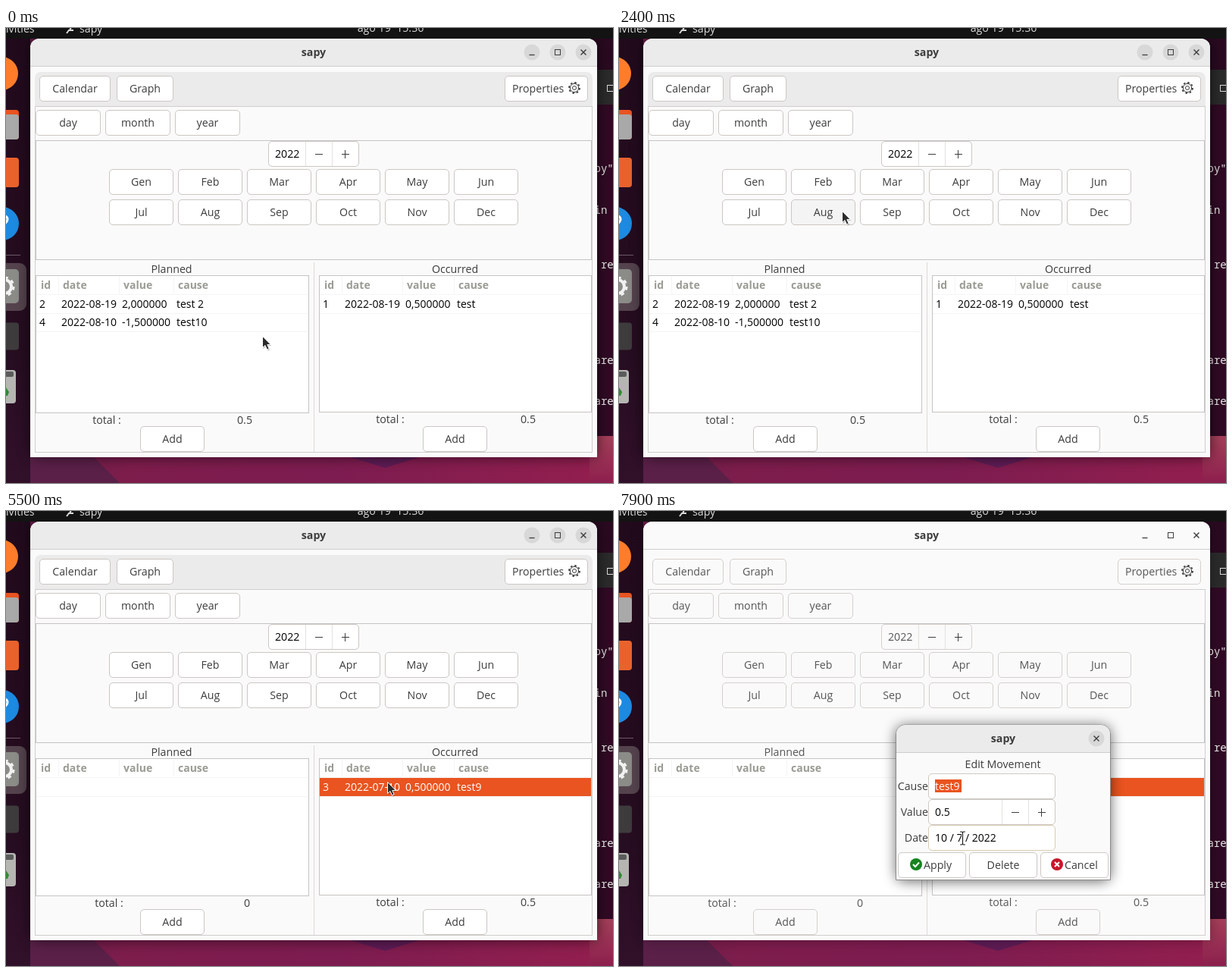
Recreate the animation shown at these times as an HTML page. Size 801x600 px, loop 8 s.

```html
<!DOCTYPE html>
<html lang="en">
<head>
<meta charset="utf-8">
<title>sapy</title>
<style>
html, body { margin: 0; width: 100%; height: 100%; overflow: hidden; background: #1c0a18; }
svg { display: block; width: 801px; height: 600px; }
text { font: 14.2px "Open Sans", "Noto Sans", sans-serif; fill: var(--text); white-space: pre; }
.cell { font-size: 14px; fill: #000; }
.head { font-size: 14px; font-weight: 700; fill: #9b9b95; }
.title { font-weight: 700; fill: #3d3d3d; }
.mono { font: 14px "Noto Sans Mono", "DejaVu Sans Mono", monospace; fill: #eee; }
.bar { fill: #dadada; }
.dim { fill: var(--label); }
.ink { fill: #3d3d3d; }
.entry { fill: var(--entry); }
.btn { fill: var(--btn); stroke: var(--edge); }
.dbtn { fill: #fff; stroke: #cdc9c5; }
.line { fill: none; stroke: #c6c4c2; }
.faint { fill: none; stroke: #f4f4f4; }
.icon { fill: none; stroke: #3d3d3d; }
.white { fill: #fff; }
</style>
</head>
<body>
<svg id="stage" viewBox="0 0 801 600"></svg>
<script>
const LOOP = 8000, STEP = 100;
const stage = document.getElementById('stage');

// Markup helpers
const rect = (x, y, w, h, attrs = '') => `<rect x="${x}" y="${y}" width="${w}" height="${h}" ${attrs}/>`;
const fill = (x, y, w, h, color, r = 0) => rect(x, y, w, h, `rx="${r}" fill="${color}"`);
const frame = (x, y, w, h, cls, r = 0, more = '') =>
  rect(x + .5, y + .5, w - 1, h - 1, `rx="${r}" class="${cls}" ${more}`);
const text = (x, y, s, cls = '', anchor = 'start', more = '') =>
  `<text x="${x}" y="${y}" class="${cls}" text-anchor="${anchor}" ${more}>${s}</text>`;
const mid = (x, y, s, cls, more) => text(x, y, s, cls, 'middle', more);
const path = (d, cls = 'icon', more = '') => `<path d="${d}" class="${cls}" ${more}/>`;
const circle = (x, y, r, color, more = '') => `<circle cx="${x}" cy="${y}" r="${r}" fill="${color}" ${more}/>`;
const group = (id, body, more = '') => `<g id="${id}" ${more}>${body}</g>`;
const button = (x, y, w, label, id = '') =>
  frame(x, y, w, 34, 'btn', 4.5, id && `id="${id}"`) + mid(x + w / 2, y + 22, label);

const minus = (x, y) => path(`M${x - 5} ${y + .5}h10`);
const plus = (x, y) => minus(x, y) + path(`M${x - .5} ${y - 5}v11`);
const closeGlyph = (x, y) => path(`M${x - 3.5} ${y - 3.5}l7 7m0 -7l-7 7`, 'icon', 'stroke-width="1.4"');

function spin(x, y, w, value, boxClass, textClass) {
  const a = x + w - 70.5, b = x + w - 35.5;
  return frame(x, y, w, 34, boxClass, 4.5) + text(x + 9, y + 22, value, textClass)
    + path(`M${a} ${y + 1}v32M${b} ${y + 1}v32`, '', 'stroke="#e3e1df"')
    + minus(a + 17.5, y + 17) + plus(b + 17.5, y + 17);
}

function cells(xs, y, row, cls) {
  return row.map((s, i) => text(xs[i], y, s, cls)).join('');
}

function table(x, h, cols) {
  const heads = cols.map(c => c + 2);
  const seps = cols.slice(1).map(c => `M${c - 3.5} 328v22`).join('');
  return frame(x, 326, cols === LEFT ? 361 : 360, h, 'line', 0, 'style="fill:#fff"')
    + path(`${seps}M${x + 1} 351.5h358M${x + 1} 376.5h358`, 'faint')
    + cells(heads, 344, ['id', 'date', 'value', 'cause'], 'head');
}

const LEFT = [44, 73, 153, 225], RIGHT = [418, 447, 527, 595];
const MONTHS = 'Gen Feb Mar Apr May Jun Jul Aug Sep Oct Nov Dec'.split(' ');

function desktop() {
  const term = [['py"', 190], ['in', 245], [' re', 317], ['are', 443], ['are', 497]];
  return fill(0, 0, 801, 600, 'url(#wall)')
    + path('M32 560H110L150 600H32z', '', 'fill="#5a2048"')
    + path('M435 560H565L500 580z', '', 'fill="#5e1c55"')
    + fill(770, 14, 31, 42, '#2a0a20') + fill(770, 538, 31, 62, 'url(#glow)')
    + fill(770, 55, 31, 483, '#300a24') + fill(770, 55, 31, 46, '#2b2b2b')
    + frame(793, 75, 12, 9, 'icon', 0, 'style="stroke:#ddd"')
    + term.map(([s, y]) => text(776.5, y, s, 'mono')).join('')
    + fill(0, 14, 32, 586, 'url(#dock)');
}

function dock() {
  return circle(-6, 60, 22, '#ff7d2a')
    + fill(-25, 108, 42, 39, '#e95420', 4) + fill(-25, 114, 42, 33, '#a9a9a9', 4)
    + fill(-25, 171, 42, 39, '#e9622c', 4)
    + circle(-5, 258, 22, '#1c8ae0') + path('M-4 247q6 1 6 5t-6 8', '', 'fill="none" stroke="#fff" stroke-width="3"')
    + path('M0 299.5h19', '', 'stroke="#6b5a66"')
    + fill(-10, 310, 37, 63, '#54434d', 9) + fill(-25, 318, 42, 45, '#8b8b88', 5)
    + circle(-2, 341, 9, 'none', 'stroke="#f2f2f2" stroke-width="4"')
    + circle(-2, 341, 12, 'none', 'stroke="#f2f2f2" stroke-width="3" stroke-dasharray="4.5 4.9"')
    + fill(-25, 388.5, 42, 36, '#3e3b3d', 4)
    + fill(-25, 451, 38, 44, '#b5b5b2', 4) + fill(-25, 453, 35, 7, '#5b5b5b', 2)
    + path('M0 474l4 6l-2 5h-4z', '', 'fill="#2f8a2f"');
}

function topBar() {
  return fill(0, 0, 801, 14, '#131313')
    + text(0, 6, 'ivities', 'bar') + text(97, 6, 'sapy', 'bar') + mid(507.5, 5, 'ago 19  15:36', 'bar')
    + path('M80 7l3 -4h6M84 3l2 -4', '', 'fill="none" stroke="#dadada" stroke-width="2"');
}

function mainWindow() {
  let s = rect(32, 14, 748, 552, 'rx="9" fill="#000" filter="url(#soft)" id="shade"')
    + path('M32 566V26a12 12 0 0 1 12 -12H768a12 12 0 0 1 12 12V566z', '', 'fill="#fafafa"')
    + path('M32 50V26a12 12 0 0 1 12 -12H768a12 12 0 0 1 12 12V50z', '', 'fill="var(--head)"')
    + path('M32 50.5H780', '', 'stroke="#d0cecc"')
    + mid(406, 37, 'sapy', 'title')
    + [694, 728, 762].map(x => circle(x, 32, 10.5, 'var(--round)')).join('')
    + path('M690.5 35.5h7', 'icon', 'stroke-width="1.3"')
    + frame(724, 28, 8, 8, 'icon') + closeGlyph(762, 32)
    + path('M38 103V66a8 8 0 0 1 8 -8H766a8 8 0 0 1 8 8V103z', '', 'fill="var(--head)"')
    + path('M38 103.5H774', 'line', 'style="stroke:#bdbbb9"')
    + frame(38, 103, 736, 457, 'line', 0, 'style="stroke:#d0cecc"')
    + button(44, 63, 94, 'Calendar') + button(146, 63, 75, 'Graph')
    + frame(658, 63, 110, 34, 'btn', 4.5) + text(668, 85, 'Properties')
    + circle(750, 79, 5.6, 'none', 'class="icon"') + circle(750, 79, 2.5, 'none', 'class="icon"')
    + circle(750, 79, 7, 'none', 'class="icon" stroke-width="1.8" stroke-dasharray="2.6 2.9"')
    + ['day', 'month', 'year'].map((m, i) => button(39 + 92 * i, 108, 86, m)).join('')
    + frame(39, 148, 734, 158, 'line')
    + spin(346, 149, 120, '2022', 'btn', 'entry')
    + MONTHS.map((m, i) => button(136 + 91 * (i % 6), i < 6 ? 186 : 226, 85, m, m)).join('')
    + path('M406.5 309V559', 'line', 'style="stroke:#dcdad8"')
    + mid(218.5, 323, 'Planned') + mid(592.5, 323, 'Occurred')
    + table(39, 182, LEFT) + table(413, 181, RIGHT);
  s += group('august',
    path('M40 400.5h358', 'faint')
    + cells(LEFT, 369, ['2', '2022-08-19', '2,000000', 'test 2'], 'cell')
    + cells(LEFT, 393, ['4', '2022-08-10', '-1,500000', 'test10'], 'cell')
    + cells(RIGHT, 369, ['1', '2022-08-19', '0,500000', 'test'], 'cell')
    + mid(133, 522, 'total :') + mid(315, 522, '0.5'));
  const july = ['3', '2022-07-10', '0,500000', 'test9'];
  s += group('july',
    cells(RIGHT, 369, july, 'cell') + mid(136, 522, 'total :') + mid(318, 522, '0'));
  s += group('picked', fill(414, 352, 358, 24, '#e95420') + cells(RIGHT, 369, july, 'cell white'));
  return s + mid(507, 521, 'total :') + mid(689, 521, '0.5')
    + button(177, 525, 85, 'Add') + button(550, 525, 85, 'Add');
}

function dialog() {
  const field = (y, label) => text(408, y + 22, label, 'dim', 'end');
  const outline = 'M365.5 486.5V294a12 12 0 0 1 12 -12H636.5a12 12 0 0 1 12 12V486.5z';
  return group('dialog',
    rect(366, 284, 282, 204, 'rx="9" fill="#000" opacity=".62" filter="url(#soft)"')
    + path(outline, '', 'fill="#fafafa" stroke="#8d8b89"')
    + path('M366 318V294a12 12 0 0 1 12 -12H636a12 12 0 0 1 12 12V318z', '', 'fill="#ebebeb"')
    + path('M366 318.5H648', '', 'stroke="#d0cecc"')
    + mid(507, 305, 'sapy', 'title') + circle(630, 300, 10.5, '#d8d8d8') + closeGlyph(630, 300)
    + mid(506.5, 339, 'Edit Movement', 'dim')
    + field(346, 'Cause') + field(380, 'Value') + field(414, 'Date')
    + frame(408, 346, 168, 34, 'dbtn', 4.5) + fill(417, 354, 35, 17, '#e95420')
    + text(417, 368, 'test9', 'cell white')
    + spin(408, 380, 168, '0.5', 'dbtn', 'cell')
    + frame(408, 414, 168, 34, 'dbtn', 4.5, 'id="date"') + text(417, 436, '10 / 7 / 2022', 'cell')
    + frame(368, 450, 90, 34, 'dbtn', 4.5, 'id="apply"')
    + circle(392, 466, 8, '#15841f') + path('M388 466l3 3l5 -5.5', '', 'fill="none" stroke="#fff" stroke-width="2"')
    + text(402, 472, 'Apply', 'ink')
    + frame(462, 450, 90, 34, 'dbtn', 4.5) + mid(507, 472, 'Delete', 'ink')
    + frame(556, 450, 90, 34, 'dbtn', 4.5)
    + circle(578, 466, 8, '#c7162b') + path('M575 463l6 6m0 -6l-6 6', '', 'stroke="#fff" stroke-width="2"')
    + text(588, 472, 'Cancel', 'ink'));
}

function pointers() {
  const arrow = 'M0 0V15L3.5 12L6 17.6L8.7 16.5L6.3 11H10.8z';
  const beam = 'M-3.5 -8.5h2.5l1 1l1 -1h2.5M0 -7.5V7.5M-3.5 8.5h2.5l1 -1l1 1h2.5';
  return group('arrow', path(arrow, '', 'transform="translate(1 1.5)" opacity=".25"')
      + path(arrow, '', 'fill="#2b2b2b" stroke="#fff" stroke-linejoin="round"'))
    + group('beam', path(beam, '', 'fill="none" stroke="#fff" stroke-width="3"')
      + path(beam, '', 'fill="none" stroke="#222" stroke-width="1.2"'));
}

const stops = list => list.map(([o, c]) => `<stop offset="${o}" stop-color="${c}"/>`).join('');
stage.innerHTML = `<defs>
  <filter id="soft" x="-20%" y="-20%" width="140%" height="140%"><feGaussianBlur stdDeviation="9"/></filter>
  <linearGradient id="wall">${stops([[0, '#66204a'], [.2, '#7d1d4c'], [.55, '#7d1c50'], [1, '#931f4e']])}</linearGradient>
  <linearGradient id="glow" x2="0" y2="1">${stops([[0, '#a5405a'], [1, '#8c1f4d']])}</linearGradient>
  <linearGradient id="dock" x2="0" y2="1">${stops([[0, '#220a1d'], [.7, '#260d20'], [1, '#31102a']])}</linearGradient>
</defs>` + desktop() + dock() + mainWindow() + dialog() + topBar() + pointers();

const el = id => document.getElementById(id);
const show = (id, on) => el(id).setAttribute('visibility', on ? 'visible' : 'hidden');
const ramp = (t, a, b) => Math.min(1, Math.max(0, (t - a) / (b - a)));
const mix = (a, b, k) => `rgb(${a.map((v, i) => Math.round(v + (b[i] - v) * k))})`;
const grey = (a, b, k) => mix([a, a, a], [b, b, b], k);

// Pointer track: time, x, y
const TRACK = [
  [400, 338, 406], [500, 352, 412], [600, 420, 402], [700, 464, 376], [800, 400, 348],
  [900, 312, 332], [1000, 281, 324], [1100, 352, 319], [1300, 352, 319], [1400, 348, 308],
  [1500, 345, 295], [1800, 340, 257], [2000, 328, 246], [2200, 294, 241], [2800, 294, 241],
  [2900, 280, 243], [3000, 252, 247], [3100, 226, 249], [3200, 213, 249], [4400, 213, 249],
  [4500, 226, 252], [4600, 262, 263], [4700, 322, 284], [4800, 390, 311], [4900, 450, 336],
  [5000, 490, 352], [5100, 503, 357], [6700, 503, 357], [6800, 492, 372], [6900, 466, 402],
  [7000, 441, 430], [7100, 453, 431]
];

function place(t) {
  const i = TRACK.findIndex(p => p[0] >= t);
  if (i < 0) return TRACK[TRACK.length - 1].slice(1);
  if (!i) return TRACK[0].slice(1);
  const [a, b] = [TRACK[i - 1], TRACK[i]], k = ramp(t, a[0], b[0]);
  return [a[1] + (b[1] - a[1]) * k, a[2] + (b[2] - a[2]) * k];
}

// Month under the pointer: name, enter, leave
const HOVERS = [['Sep', 1700, 2100], ['Aug', 2100, 2900], ['Jul', 3000, 4500]];

function draw(t) {
  const away = ramp(t, 6200, 6500);
  const vars = {
    head: grey(235, 250, away), btn: grey(255, 250, away), round: grey(216, 250, away),
    text: grey(61, 86, away), entry: grey(0, 86, away), label: grey(108, 61, away),
    edge: mix([203, 199, 195], [213, 208, 204], away)
  };
  for (const name in vars) stage.style.setProperty('--' + name, vars[name]);

  for (const [id, enter, leave] of HOVERS) {
    const k = ramp(t, enter, enter + 200) - ramp(t, leave, leave + 200);
    el(id).style.fill = k > 0 ? grey(255, 244, k) : '';
  }
  if (t >= 3500 && t < 3700) el('Jul').style.fill = t < 3600 ? '#d9d9d9' : '#e6e6e6';

  el('shade').setAttribute('opacity', .6 - .28 * away);
  show('august', t < 3600);
  show('july', t >= 3600);
  show('picked', t >= 5500);
  show('dialog', t >= 6200);
  el('apply').style.fill = grey(214, 255, away);
  el('date').style.stroke = mix([205, 201, 197], [218, 203, 178], ramp(t, 7400, 7900));

  const inField = t >= 6800;
  const [x, y] = place(t).map(Math.round);
  show('arrow', !inField);
  show('beam', inField);
  el(inField ? 'beam' : 'arrow').setAttribute('transform', `translate(${x + .5} ${y + .5})`);
}

const start = performance.now();
function tick() {
  const t = (performance.now() - start) % LOOP;
  draw(Math.floor(t / STEP) * STEP);
  requestAnimationFrame(tick);
}
tick();
</script>
</body>
</html>
```
